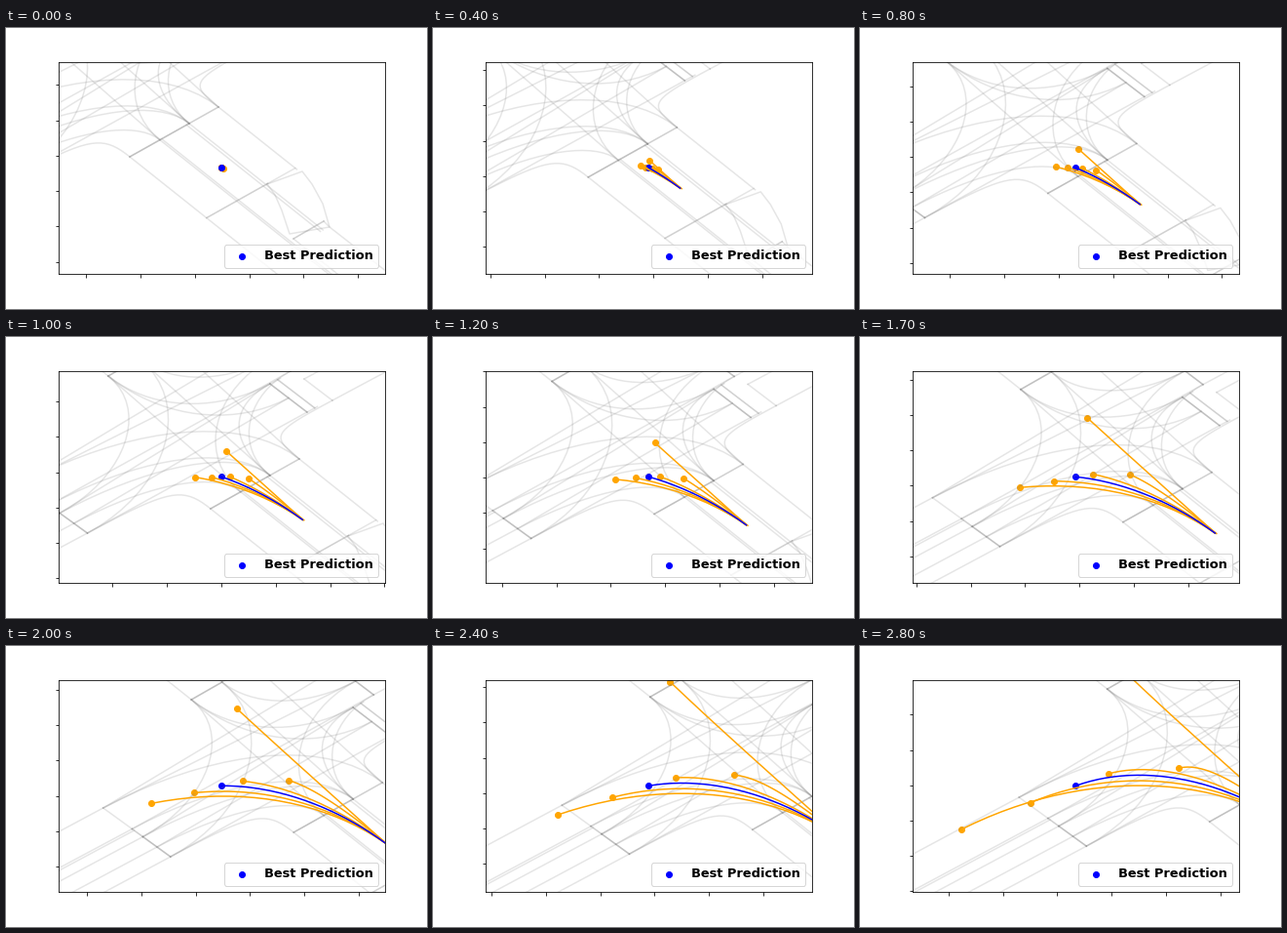
A matplotlib script for the animation above (2.9 s loop, 432 px wide and 288 px high).

```python
import numpy as np
import matplotlib.pyplot as plt
from matplotlib.animation import FuncAnimation
from matplotlib.ticker import MultipleLocator

STEPS = 29
TIME = np.arange(STEPS)
CENTER = np.array([221.4, 143.28])


def speed(base, gain, bend=0):
    """Distance covered when the mean speed drifts with time."""
    return TIME * (base + gain * TIME + bend * TIME**2)


def track(xs, ys, start=(0, 0)):
    return np.column_stack([speed(*xs), speed(*ys)]) + start


# Camera shift: the view follows the best prediction.
shift = track((7.85, 0.06, -0.0016), (5.75, -0.13, -0.0005))
best = CENTER - shift

# The other predictions drift away from the best one.
others = [best + drift for drift in (
    track((-1.6, -0.12, 0.001), (-0.82, 0.086)),
    track((-0.75, -0.033), (-0.3, 0.033)),
    track((0.72, 0.0175), (0.27, -0.0255)),
    track((1.55, 0.125, -0.0017), (0.6, -0.045), start=(1.5, 0.5)),
    track((0.12, 0.033), (-1.25, -0.145, 0.0005)),
)]

fig, ax = plt.subplots(figsize=(6, 4), dpi=72)
fig.subplots_adjust(left=0.125, right=0.9, bottom=0.125, top=0.88)
ax.xaxis.set_major_locator(MultipleLocator(55.8, offset=82.3))
ax.yaxis.set_major_locator(MultipleLocator(36.24, offset=58.4))
ax.tick_params(labelbottom=False, labelleft=False)


def road(*points, times=1):
    xs, ys = zip(*points)
    for _ in range(times):
        ax.plot(xs, ys, color="grey", alpha=0.2)


class Arm:
    """One road of the junction: a stop line and the way leading out."""

    def __init__(self, first, last, out):
        self.first, self.last, self.out = map(np.array, (first, last, out))

    def at(self, f, dist=0):
        return self.first + f * (self.last - self.first) + dist * self.out

    def stop(self, f, g, times=3, dist=0):
        road(self.at(f, dist), self.at(g, dist), times=times)

    def lanes(self, fractions, length=260):
        for f in fractions:
            road(self.at(f), self.at(f, length))


def turn(a, f, b, g, pull=0.6):
    """Curve between two arms, pulled towards where their lanes cross."""
    p, q = a.at(f), b.at(g)
    s, r = np.linalg.solve(np.column_stack([a.out, -b.out]), q - p)
    u, v = p + pull * s * a.out, q + pull * r * b.out
    t = np.linspace(0, 1, 20)[:, None]
    road(*((1 - t)**3 * p + 3 * t * (1 - t)**2 * u
           + 3 * t**2 * (1 - t) * v + t**3 * q))


def straight(a, b, *pairs):
    for f, g in pairs:
        road(a.at(f), b.at(g))


se = Arm((127, 132), (218, 81), (0.78, 0.62))
ne_in = Arm((226, 33), (188, 4), (0.88, -0.47))
ne_out = Arm((209, -9), (172, -37), (0.88, -0.47))
ne_kerb = Arm((252, 21), (223, -1), (0.88, -0.47))
west = Arm((0.6, 157), (-68.5, 107), (-0.88, 0.47))
nw = Arm((22, -4), (85, -40), (-0.78, -0.62))

# South-east road with its crossing
se.stop(0, 2 / 3)
se.stop(2 / 3, 1, times=2)
se.stop(0, 0.69, times=2, dist=101)
se.stop(0.69, 1, times=1, dist=101)
se.lanes([0, 0.34, 0.36])
se.lanes([0.64, 0.67], 176)
se.lanes([1], 103)
road((268, 160), (304, 147), (314, 160), (325, 180), (332, 204), (291, 211),
     (283, 187), (276, 171), (268, 160))
road((295, 216), (326, 198), times=2)
road((326, 198), (332, 204), (391, 250))
road((295, 216), (340, 252))

# North-east road
ne_in.stop(0, 1)
ne_in.stop(0, 1, times=2, dist=9)
ne_out.stop(0, 1)
ne_kerb.stop(0, 1, times=1)
ne_in.lanes([0, 1], 12)
ne_out.lanes([0, 0.5])
ne_kerb.lanes([0, 1])

# West road
west.stop(0, 0.41)
west.stop(0.41, 0.57, times=2)
west.stop(0.57, 1, times=1)
west.lanes([0, 0.2, 0.41, 0.54, 0.57, 1])

# North-west road
nw.stop(0, 0.5)
nw.stop(0.5, 1, times=1)
nw.lanes([0, 0.5])

# Straight lanes through the junction
straight(west, ne_in, (0, 0), (0.2, 0.5), (0.41, 1))
straight(west, ne_out, (0.57, 0), (1, 0.5), (1, 1))
straight(se, nw, (0.34, 0), (0.67, 0.5), (1, 1))

# Kerbs and turning lanes
turn(se, 0, west, 0, 0.9)
turn(ne_kerb, 0, se, 1, 0.95)
turn(se, 0.34, west, 0.2)
turn(se, 0.67, west, 0.41)
turn(ne_in, 1, se, 0.67)
turn(ne_in, 1, nw, 0)
turn(ne_in, 0.5, nw, 0)
turn(ne_out, 0.5, nw, 0.5)
turn(nw, 0, west, 0.41, 0.5)
turn(nw, 0.5, west, 0, 0.5)
turn(se, 0.34, ne_out, 0.5, 0.5)
turn(se, 0.67, ne_out, 0, 0.5)
turn(west, 1, se, 1)
turn(west, 0.57, se, 0.67)

paths = [ax.plot([], [], color="orange")[0] for _ in others]
best_path, = ax.plot([], [], color="blue")
dots = ax.scatter([0] * len(others), [0] * len(others), color="orange")
best_dot = ax.scatter([0], [0], color="blue", label="Best Prediction")
ax.legend(loc="lower right", prop={"size": 13, "weight": "bold"})


def draw(i):
    dx, dy = shift[i]
    ax.set_xlim(54 - dx, 388.8 - dx)
    ax.set_ylim(252 - dy, 34.56 - dy)
    for line, path in zip(paths + [best_path], others + [best]):
        line.set_data(path[:i + 1, 0], path[:i + 1, 1])
    dots.set_offsets([path[i] for path in others])
    best_dot.set_offsets([best[i]])


anim = FuncAnimation(fig, draw, frames=STEPS, interval=100,
                     init_func=lambda: draw(0), repeat=True, repeat_delay=0)
plt.show()
```
